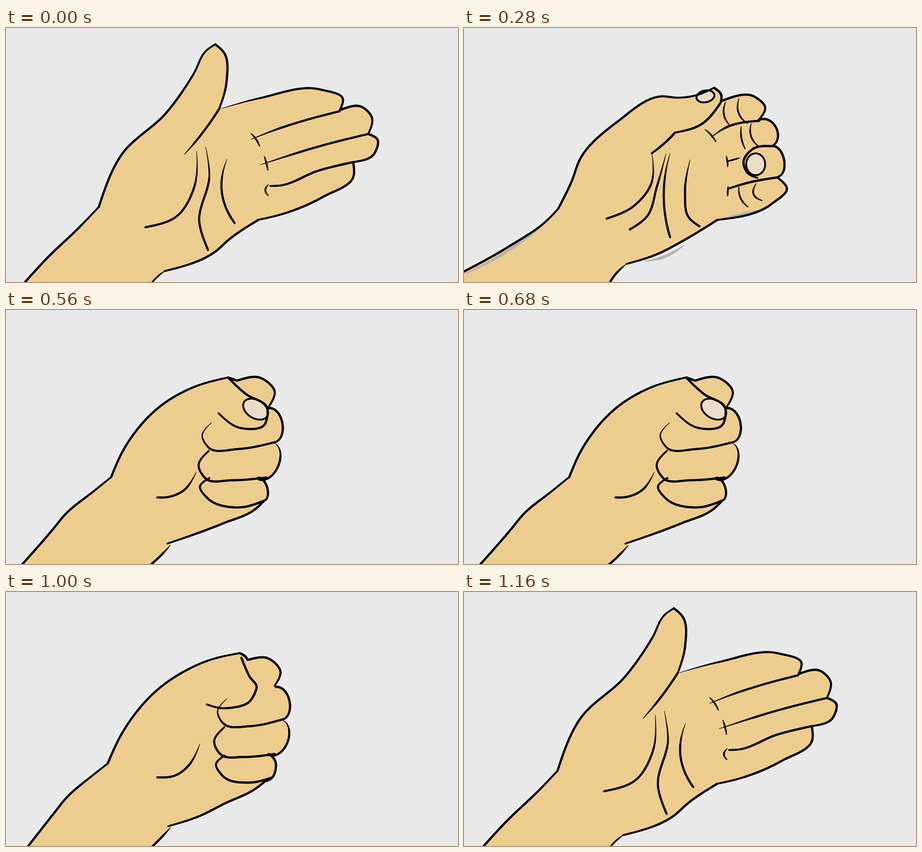
Animation of 998x561 px, one loop 1.2 s. Source, as an HTML page with a canvas:

```html
<!DOCTYPE html>
<html lang="en">
<head>
<meta charset="utf-8">
<title>Closing hand</title>
<style>
  html, body { margin: 0; width: 100%; height: 100%; overflow: hidden; background: #e9e9e9; }
  canvas { display: block; width: 998px; height: 561px; }
</style>
</head>
<body>
<canvas id="stage" width="998" height="561"></canvas>
<script>
const ctx = document.getElementById('stage').getContext('2d');
const PAPER = '#e9e9e9', SKIN = '#edcd8e', INK = '#000', NAIL = '#eadcc6', GREY = '#b6b3ac';
const LOOP = 1200, STEP = 40, DRIFT = 1.4 / 1160, N = 48;

const mix = (a, b, k) => a + (b - a) * k;
const sample = at => Array.from({ length: N + 1 }, (_, i) => at(i / N));

// --- Shapes: each gives N + 1 points ---

// Smooth curve through a few key points
function curve(...flat) {
  const p = [];
  for (let i = 0; i < flat.length; i += 2) p.push([flat[i], flat[i + 1]]);
  const last = p.length - 1;
  const d = p.slice(1).map((q, i) => Math.hypot(q[0] - p[i][0], q[1] - p[i][1]));
  const total = d.reduce((a, b) => a + b, 0);
  const slope = (i, k) => (p[i + 1][k] - p[i][k]) / d[i];
  // End slopes make the first and last spans bend like the rest
  const inner = (i, k) => (slope(i - 1, k) * d[i] + slope(i, k) * d[i - 1]) / (d[i - 1] + d[i]);
  const tangent = (i, k) => {
    if (last === 1) return slope(0, k);
    if (i === 0) return 1.5 * slope(0, k) - 0.5 * inner(1, k);
    if (i === last) return 1.5 * slope(last - 1, k) - 0.5 * inner(last - 1, k);
    return inner(i, k);
  };
  let i = 0, before = 0;
  return sample(u => {
    const s = total * u;
    while (i < last - 1 && s > before + d[i]) before += d[i++];
    const v = Math.min(1, (s - before) / d[i]), v2 = v * v, v3 = v2 * v;
    return [0, 1].map(k =>
      (2 * v3 - 3 * v2 + 1) * p[i][k] + (v3 - 2 * v2 + v) * d[i] * tangent(i, k) +
      (3 * v2 - 2 * v3) * p[i + 1][k] + (v3 - v2) * d[i] * tangent(i + 1, k));
  });
}

// Point beside the chord: k along it, h to its left
function beside(x0, y0, x1, y1, k, h) {
  const dx = x1 - x0, dy = y1 - y0, len = Math.hypot(dx, dy);
  return [x0 + dx * k + dy / len * h, y0 + dy * k - dx / len * h];
}

const arc = (x0, y0, x1, y1, bend = 0) =>
  sample(u => beside(x0, y0, x1, y1, u, 4 * bend * u * (1 - u)));

// Half ellipse that caps a finger
const cap = (x0, y0, x1, y1, out) =>
  sample(u => beside(x0, y0, x1, y1, (1 - Math.cos(Math.PI * u)) / 2, out * Math.sin(Math.PI * u)));

// Folded finger: along its lower side, round the left end and back on top
function roll(x, y, left, top, base) {
  const h = base - top;
  return curve(x, y, mix(left, x, 0.5), base, left + 0.25 * h, base - 0.05 * h,
    left, top + h / 2, left + 0.35 * h, top);
}

const oval = (cx, cy, rx, ry, tilt = 0) => sample(u => {
  const x = rx * Math.cos(u * 2 * Math.PI), y = ry * Math.sin(u * 2 * Math.PI);
  return [cx + x * Math.cos(tilt) - y * Math.sin(tilt), cy + x * Math.sin(tilt) + y * Math.cos(tilt)];
});

// --- Strokes: a and b are the relative widths of the two ends ---

const pen = path => ({ path, w: 4.8, a: 1, b: 0.8 });
const growing = path => ({ path, w: 4.6, a: 0.2, b: 1 });
const fading = path => ({ path, w: 4.6, a: 1, b: 0.25 });
const fine = path => ({ path, w: 3.4, a: 0.4, b: 0.6 });
const nail = path => ({ path, w: 3.8, a: 1, b: 1, fill: NAIL });
const smear = path => ({ path, w: 6, a: 0.3, b: 0.3, color: GREY, under: true });
const creases = (...paths) => Object.fromEntries(paths.map((path, i) => ['crease' + i, growing(path)]));
const details = (...paths) => Object.fromEntries(paths.map((path, i) => ['detail' + i, fine(path)]));

// Points are placed as seen at the given time, so undo the drift up to then
function pose(at, lines) {
  for (const l of Object.values(lines)) for (const q of l.path) q[0] -= at * DRIFT;
  return lines;
}

// Outline parts, clockwise from the forearm
const EDGES = ['arm', 'thumbOut', 'thumbIn', 'index', 'middle', 'ring', 'pinky', 'heel', 'wrist'];

const open = pose(0, {
  arm: pen(curve(36, 568, 90, 509, 165, 437, 205, 395)),
  thumbOut: pen(curve(205, 395, 255, 280, 355, 186, 415, 100, 442, 50, 462, 36)),
  thumbIn: pen(curve(462, 36, 481, 54, 487, 118, 471, 178)),
  thumbFold: fading(arc(471, 178, 394, 279, 3)),
  index: growing(curve(475, 178, 560, 155, 695, 136, 744, 157, 736, 184)),
  indexLow: fading(curve(736, 184, 660, 204, 600, 223, 541, 246)),
  middle: pen(curve(738, 181, 785, 174, 808, 198, 800, 234)),
  middleLow: fading(curve(800, 234, 700, 259, 562, 302)),
  ring: pen(curve(800, 234, 820, 246, 812, 279, 768, 296)),
  ringLow: pen(curve(768, 296, 690, 315, 604, 348, 584, 349)),
  pinky: pen(curve(767, 299, 768, 325, 700, 373, 610, 411, 555, 424)),
  heel: pen(curve(557, 424, 495, 465, 462, 494, 350, 537)),
  wrist: fine(arc(350, 537, 316, 570, -2)),
  ...creases(curve(421, 272, 416, 350, 378, 415, 308, 440),
    curve(441, 263, 449, 325, 427, 430, 446, 490), arc(488, 290, 505, 431, -20)),
  ...details(arc(541, 233, 560, 261, 2), arc(570, 283, 578, 314, 1), arc(580, 346, 579, 370, -7))
});

const curl = pose(280, {
  arm: pen(curve(-8, 542, 100, 482, 182, 426, 208, 399)),
  thumbOut: pen(curve(208, 399, 238, 338, 256, 290, 340, 206, 435, 151, 475, 154, 515, 148, 552, 132)),
  thumbIn: pen(curve(552, 132, 568, 148, 566, 166)),
  thumbFold: pen(curve(566, 166, 525, 212, 466, 231)),
  thumbHollow: pen(arc(466, 231, 414, 277, 2)),
  index: pen(curve(569, 161, 642, 152, 665, 175, 648, 206)),
  indexLow: fading(curve(652, 205, 580, 219, 546, 241)),
  middle: pen(cap(652, 203, 680, 261, 26)),
  middleLow: pen(curve(680, 261, 638, 267, 617, 296, 626, 320, 648, 331)),
  ring: pen(cap(680, 261, 694, 328, 20)),
  ringLow: pen(curve(692, 330, 630, 341, 583, 355)),
  pinky: pen(curve(692, 330, 713, 354, 680, 388, 558, 424)),
  heel: pen(curve(559, 424, 480, 472, 430, 498, 359, 521)),
  wrist: growing(arc(358, 522, 318, 570, -4)),
  ...creases(curve(415, 277, 413, 345, 375, 393, 315, 421), arc(455, 277, 455, 462, -14),
    curve(499, 291, 488, 365, 496, 418, 520, 438), curve(446, 278, 426, 350, 404, 416, 366, 445)),
  ...details(arc(532, 224, 556, 251, 2), arc(579, 283, 582, 306, 1), arc(583, 350, 582, 371),
    arc(609, 287, 580, 295), arc(578, 163, 585, 213, -8), arc(607, 156, 626, 211, -11),
    arc(612, 218, 621, 267, -4), arc(634, 211, 651, 262, -9),
    arc(607, 350, 627, 395, -7), arc(645, 344, 658, 381, -13)),
  thumbNail: nail(oval(533, 151, 20, 13, -0.2)),
  ringNail: nail(oval(644, 301, 21, 24)),
  shade0: smear(arc(-6, 546, 205, 406, -12)),
  shade1: smear(arc(400, 515, 485, 480, -7)),
  shade2: smear(arc(562, 424, 652, 402))
});

const fist = pose(400, {
  arm: pen(curve(30, 568, 102, 486, 130, 452, 195, 399, 232, 369)),
  thumbOut: pen(curve(232, 369, 262, 304, 345, 209, 410, 172, 490, 149)),
  thumbIn: pen(arc(490, 149, 510, 156)),
  thumbFold: pen(curve(490, 149, 530, 186, 576, 215, 570, 254, 515, 260, 469, 228)),
  index: pen(curve(510, 156, 562, 150, 593, 180, 580, 214)),
  middle: pen(cap(580, 217, 593, 292, 24)),
  middleLow: fading(roll(593, 292, 433, 249, 307)),
  ring: growing(cap(592, 294, 558, 374, 28)),
  ringLow: pen(roll(575, 370, 425, 311, 376)),
  pinky: pen(cap(556, 371, 570, 421, 14)),
  pinkyLow: pen(curve(570, 421, 515, 436, 445, 416, 428, 390, 449, 371)),
  heel: pen(curve(570, 421, 550, 440, 480, 471, 356, 516)),
  wrist: growing(arc(363, 519, 310, 570, 2)),
  ...creases(curve(420, 358, 390, 400, 358, 413, 334, 414)),
  ...details(arc(410, 219, 435, 249, -9), arc(452, 219, 454, 248, -9),
    arc(446, 438, 460, 469, -6), arc(434, 299, 452, 313, -2)),
  thumbNail: nail(oval(551, 219, 30, 20, 0.55))
});

const half = pose(1080, {
  arm: pen(curve(70, 568, 115, 490, 160, 436, 208, 399)),
  thumbOut: pen(curve(208, 399, 255, 308, 340, 207, 430, 147, 490, 121, 567, 107)),
  thumbIn: pen(arc(567, 107, 578, 138, 9)),
  thumbFold: pen(curve(578, 138, 528, 199, 475, 217, 391, 289)),
  index: pen(curve(580, 138, 612, 139, 631, 165, 618, 194)),
  indexLow: fading(roll(624, 187, 559, 179, 207)),
  middle: pen(cap(627, 196, 645, 260, 21)),
  middleLow: pen(roll(645, 260, 532, 209, 275)),
  ring: pen(cap(645, 261, 628, 333, 27)),
  ringLow: pen(roll(628, 333, 526, 274, 341)),
  pinky: pen(curve(626, 332, 643, 365, 622, 399, 575, 413)),
  pinkyLow: pen(roll(625, 386, 532, 341, 391)),
  heel: pen(curve(572, 415, 490, 456, 425, 503, 361, 520)),
  wrist: growing(arc(363, 522, 322, 570, -1)),
  ...creases(curve(443, 290, 420, 355, 385, 394, 333, 400),
    curve(454, 257, 455, 350, 452, 395, 465, 455), arc(491, 339, 516, 441, -3)),
  ...details(arc(445, 208, 467, 220, 2), arc(481, 187, 487, 210, -1), arc(574, 401, 574, 410)),
  indexNail: nail(oval(585, 183, 21, 16, -0.2)),
  middleNail: nail(oval(574, 241, 27, 19, 0.1)),
  ringNail: nail(oval(560, 308, 21, 20)),
  pinkyNail: nail(oval(557, 366, 19, 17, 0.4))
});

const KEYS = [[0, open], [160, open], [280, curl], [400, fist], [960, fist], [1080, half], [1160, open], [LOOP, open]];

// Lines found in both poses move; the others show only close to their own pose
function blend(from, to, k) {
  const out = {}, near = k < 0.5 ? from : to;
  for (const [name, line] of Object.entries(near)) {
    const a = from[name], b = to[name];
    const paired = a && b && !name.startsWith('detail');
    if (paired) {
      const path = a.path.map((q, i) => [mix(q[0], b.path[i][0], k), mix(q[1], b.path[i][1], k)]);
      out[name] = { ...line, path };
    } else if (Math.min(k, 1 - k) < 0.2) {
      out[name] = line;
    }
  }
  return out;
}

function fill(points, color) {
  ctx.beginPath();
  points.forEach(q => ctx.lineTo(q[0], q[1]));
  ctx.closePath();
  ctx.fillStyle = color;
  ctx.fill();
}

function stroke({ path, w, a, b, color = INK }) {
  ctx.strokeStyle = color;
  for (let i = 0; i < N; i++) {
    const u = (i + 0.5) / N;
    const start = mix(a, 1, Math.min(1, u / 0.35)), end = mix(b, 1, Math.min(1, (1 - u) / 0.35));
    ctx.lineWidth = w * start * end;
    ctx.beginPath();
    ctx.moveTo(...path[i]);
    ctx.lineTo(...path[i + 1]);
    ctx.stroke();
  }
}

function draw(t) {
  const i = KEYS.findIndex((key, n) => t < KEYS[n + 1][0]);
  const [t0, from] = KEYS[i], [t1, to] = KEYS[i + 1];
  const hand = blend(from, to, (t - t0) / (t1 - t0));
  const lines = Object.values(hand);

  ctx.setTransform(1, 0, 0, 1, 0, 0);
  ctx.fillStyle = PAPER;
  ctx.fillRect(0, 0, 998, 561);
  ctx.translate(t * DRIFT, 0);
  ctx.lineCap = 'round';

  fill([...EDGES.flatMap(name => hand[name].path), [-12, 572]], SKIN);
  lines.filter(l => l.under).forEach(stroke);
  lines.filter(l => l.fill).forEach(l => fill(l.path, l.fill));
  lines.filter(l => !l.under).forEach(stroke);
}

const begin = performance.now();
function tick() {
  const t = (performance.now() - begin) % LOOP;
  draw(Math.floor(t / STEP) * STEP);
  requestAnimationFrame(tick);
}
tick();
</script>
</body>
</html>
```
